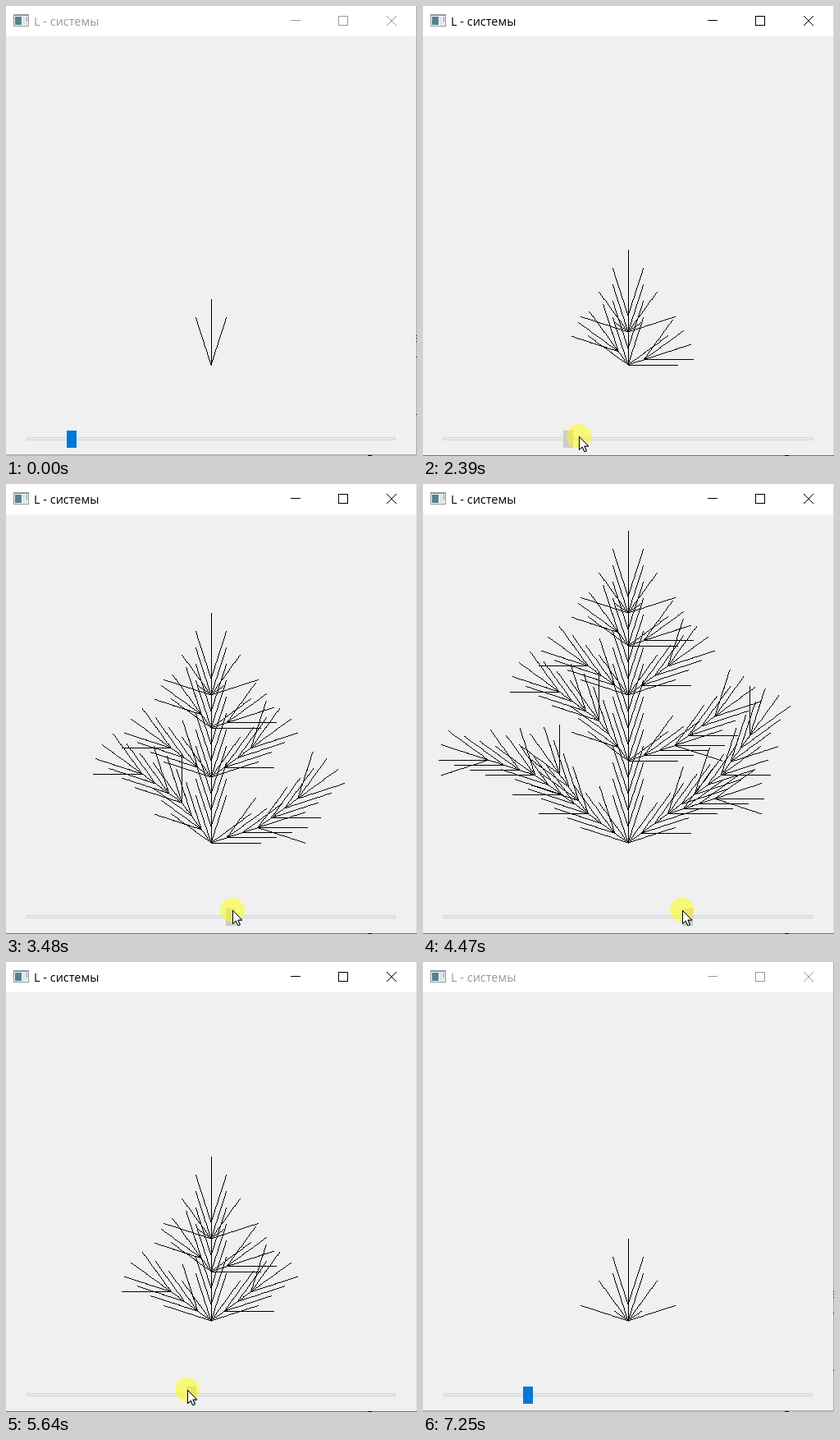
Animation, 501 px wide and 548 px high, one loop 7340 ms. Source, as an HTML page with a canvas:

```html
<!DOCTYPE html>
<html lang="ru">
<head>
<meta charset="utf-8">
<title>L - системы</title>
<style>
html, body { margin: 0; width: 100%; height: 100%; overflow: hidden; background: #f0f0f0; }
canvas { display: block; }
</style>
</head>
<body>
<canvas id="stage" width="501" height="548"></canvas>
<script>
const W = 501, H = 548, LOOP = 7340;
const ACTIVE = 700, RELEASE = 6520, INACTIVE = 7250;
const ctx = document.getElementById('stage').getContext('2d');

const RULES = {
  V: '[+++W][---W]YV',
  W: '+X[-W]Z',
  X: '-W[+X]Z',
  Y: 'YZ',
  Z: '[-FFF][+FFF]F'
};
const STEP = 20, TURN = Math.PI / 10;

// Pointer moves: start, end, number of steps, target x, target y
const START = [128, 549];
const MOVES = [
  [310, 530, 4, 80, 525],
  [860, 1150, 5, 123, 525],
  [1470, 1930, 7, 172, 525],
  [2240, 2700, 7, 218, 523],
  [3020, 3480, 7, 276, 519],
  [3710, 4090, 6, 328, 519],
  [4470, 4630, 3, 282, 520],
  [4860, 5320, 7, 225, 521],
  [5570, 5950, 6, 175, 525],
  [6100, 6330, 4, 133, 527],
  [6520, 6870, 6, 475, 552]
];

function rect(c, color, x, y, w, h) {
  c.fillStyle = color;
  c.fillRect(x, y, w, h);
}

// One-pixel line without antialiasing
function line(c, x0, y0, x1, y1) {
  const n = Math.ceil(Math.max(Math.abs(x1 - x0), Math.abs(y1 - y0)) - 0.01);
  for (let i = 0; i <= n; i++) {
    const x = x0 + (x1 - x0) * i / n, y = y0 + (y1 - y0) * i / n;
    c.fillRect(Math.floor(x + 0.01), Math.floor(y + 0.01), 1, 1);
  }
}

function growPlant(level) {
  let word = 'VZFFF';
  for (let i = 0; i < level; i++) word = word.replace(/[V-Z]/g, s => RULES[s]);
  const layer = document.createElement('canvas');
  layer.width = W;
  layer.height = H;
  const c = layer.getContext('2d'), stack = [];
  let x = 250, y = 437, turns = 0;
  for (const s of word) {
    if (s === 'F') {
      const nx = x + STEP * Math.sin(turns * TURN);
      const ny = y - STEP * Math.cos(turns * TURN);
      line(c, x, y, nx, ny);
      x = nx;
      y = ny;
    } else if (s === '+') turns++;
    else if (s === '-') turns--;
    else if (s === '[') stack.push([x, y, turns]);
    else if (s === ']') [x, y, turns] = stack.pop();
  }
  return layer;
}

const plants = {};
for (let level = 2; level <= 7; level++) plants[level] = growPlant(level);

function pointerAt(t) {
  let [x, y] = START;
  for (const [from, to, n, tx, ty] of MOVES) {
    if (t < from) break;
    const gap = (to - from) / (n - 1);
    const p = Math.min(1, (Math.floor((t - from) / gap + 0.05) + 1) / n);
    const e = p * p * (3 - 2 * p);
    x += (tx - x) * e;
    y += (ty - y) * e;
  }
  return [Math.round(x), Math.round(y)];
}

const levelAt = x => Math.max(2, Math.min(7, Math.round(1 + (x - 31) / 48.67)));

function drawWindow(active) {
  rect(ctx, '#f0f0f0', 0, 0, W, H);
  rect(ctx, '#fff', 0, 0, W, 37);

  rect(ctx, '#8b989e', 9, 10, 19, 15);
  rect(ctx, '#f4f6f7', 10, 12, 17, 12);
  rect(ctx, '#55818f', 11, 13, 8, 10);
  rect(ctx, '#e2e6e8', 20, 13, 6, 10);
  rect(ctx, '#8b989e', 25, 13, 1, 6);

  const ink = active ? '#000' : '#999';
  ctx.fillStyle = ink;
  ctx.font = '14.5px "Open Sans", "Noto Sans", sans-serif';
  ctx.fillText('L - системы', 34, 24);
  ctx.fillRect(347, 17, 12, 1);
  ctx.strokeStyle = ink;
  ctx.lineWidth = 1;
  ctx.strokeRect(405.5, 12.5, 11, 11);
  ctx.beginPath();
  ctx.moveTo(464, 12);
  ctx.lineTo(476, 24);
  ctx.moveTo(476, 12);
  ctx.lineTo(464, 24);
  ctx.stroke();

  if (active) {
    rect(ctx, '#dcdcdc', 500, 0, 1, H);
    rect(ctx, '#707070', 0, 547, W, 1);
  } else {
    rect(ctx, '#aaa', 500, 0, 1, H);
    rect(ctx, '#a8a8a8', 0, 546, W, 1);
    rect(ctx, '#c0c0c0', 0, 547, W, 1);
    for (const y of [401, 404, 408, 427, 497]) rect(ctx, '#000', 500, y, 1, 1);
  }
  rect(ctx, '#000', 441, 547, 5, 1);

  rect(ctx, '#d6d6d6', 25, 525, 450, 4);
  rect(ctx, '#e7eaea', 26, 526, 448, 2);
}

function drawPointer(x, y, pressed) {
  if (pressed) {
    ctx.fillStyle = 'rgba(255,255,0,.5)';
    ctx.beginPath();
    ctx.arc(x, y, 15, 0, 2 * Math.PI);
    ctx.fill();
  }
  ctx.save();
  ctx.translate(x + 0.5, y + 0.5);
  ctx.fillStyle = '#fff';
  ctx.strokeStyle = '#000';
  ctx.stroke(arrow);
  ctx.fill(arrow);
  ctx.stroke(arrow);
  ctx.restore();
}
const arrow = new Path2D('M0 0V16L3.7 12.5L6.3 18.3L8.8 17.2L6.3 11.5H11.3Z');

function draw(t) {
  const pressed = t >= ACTIVE && t < RELEASE;
  const [x, y] = pointerAt(t);
  const level = t < ACTIVE ? 2 : levelAt(pointerAt(Math.min(t, RELEASE - 1))[0]);
  const left = Math.round(31 + 48.67 * (level - 1)) - 6;
  const hover = x >= left && x < left + 12 && y >= 517 && y < 538;

  drawWindow(t >= ACTIVE && t < INACTIVE);
  ctx.drawImage(plants[level], 0, 0);
  rect(ctx, pressed ? '#ccc' : hover ? '#171717' : '#0078d7', left, 517, 12, 21);
  if (y < H) drawPointer(x, y, pressed);
}

function frame(now) {
  draw(now % LOOP);
  requestAnimationFrame(frame);
}
requestAnimationFrame(frame);
</script>
</body>
</html>
```
